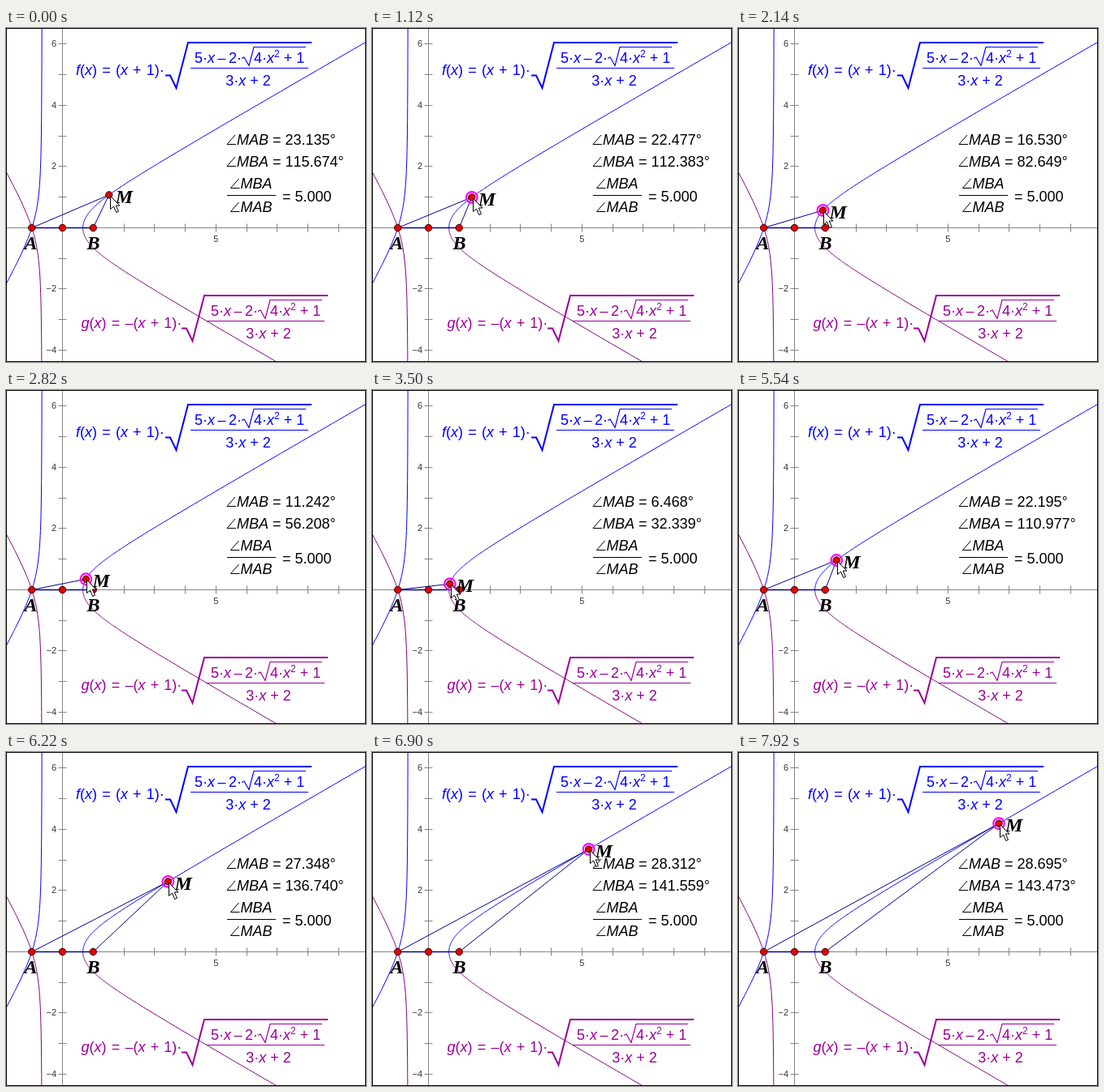
These frames come from a looping animation (443 by 412 pixels, 8000 ms). An HTML page:

```html
<!DOCTYPE html>
<html>
<head>
<meta charset="utf-8">
<style>
  html, body { margin: 0; height: 100%; overflow: hidden; background: #fff; }
  svg { display: block; }
  text { font: 18px "Liberation Sans", Arial, sans-serif; font-kerning: none; white-space: pre; }
  .tick { font-size: 11px; fill: #333; }
  .name { font: italic bold 24px "Liberation Serif", "Times New Roman", serif; }
  .i { font-style: italic; }
  .sup { font-size: 12px; }
  .line { fill: none; stroke: currentColor; }
</style>
</head>
<body>
<svg id="stage" width="443" height="412" viewBox="0 0 443 412"></svg>
<script>
const UNIT = 37.75, OX = 69.5, OY = 246.5, LOOP = 8000;
const X = x => OX + x * UNIT, Y = y => OY - y * UNIT;
const it = s => `<tspan class="i">${s}</tspan>`;
const text = (x, y, s, attrs = '') => `<text x="${x}" y="${y}" ${attrs}>${s}</text>`;
const line = (d, width = 1, attrs = '') => `<path class="line" d="${d}" stroke-width="${width}" ${attrs}/>`;
const dot = (x, y) => `<circle cx="${x}" cy="${y}" r="4.2" fill="#e60000" stroke="#300"/>`;

const f = x => (x + 1) * Math.sqrt(Math.max(0, (5 * x - 2 * Math.sqrt(4 * x * x + 1)) / (3 * x + 2)));

// Squared parameter keeps the samples dense near the steep ends at ±2/3.
function branch(side, sign, end) {
  let d = '';
  for (let s = side > 0 ? 0 : 0.03; s < end; s += 0.015) {
    const x = side * (2 / 3 + s * s);
    d += (d ? 'L' : 'M') + X(x).toFixed(2) + ' ' + Y(sign * f(x)).toFixed(2);
  }
  return d;
}
const curve = (sign, color) => line(branch(-1, sign, 1.12) + branch(1, sign, 3.08), 1, `color="${color}"`);

function axes() {
  let d = `M1 ${OY}H442M${OX} 1V411`, labels = '';
  for (let n = -1; n < 10; n++) d += `M${Math.floor(X(n)) + .5} ${OY - 5}v10`;
  for (let n = -4; n < 7; n++) {
    d += `M${OX - 5} ${Math.ceil(Y(n)) - .5}h10`;
    if (n && n % 2 === 0) labels += text(62, Y(n) + 3, String(n).replace('-', '−'), 'class="tick" text-anchor="end"');
  }
  labels += text(X(5), 264, '5', 'class="tick" text-anchor="middle"');
  return line(d, 1, 'color="#858585"') + labels;
}

const x = it('x');

function rootFraction(dx, dy, denomX) {
  return `<g transform="translate(${dx} ${dy})">` +
    line('M196 58.5H202L209.5 74L224 18H376', 2) +
    line('M227 49.5H372') +
    line('M290 37.5L293 36L299 46.5L305 23.5H369', 1.2) +
    text(232, 42.5, `5·${x} – 2·`, 'word-spacing="-1.5"') +
    text(305, 42.5, `4·${x}<tspan class="sup" dy="-7">2</tspan><tspan dy="7"> + 1</tspan>`) +
    text(denomX, 71, `3·${x} + 2`, 'text-anchor="middle"') + '</g>';
}

const formula = (color, left, y, s, root) =>
  `<g fill="${color}" color="${color}">${text(left, y, s, 'word-spacing="1.2"')}${root}</g>`;

const angle = (left, y, name, tail = '') =>
  line(`M${left + 11} ${y - 12}L${left + 1} ${y - .5}h11`) + text(left + 13, y, it(name) + tail);

stage.innerHTML =
  axes() + curve(-1, '#800080') + curve(1, '#00f') +
  line(`M${X(-1)} ${OY}H${X(1)}`, 1.3, 'color="#0000a0"') +
  line('', 1, 'id="sides" color="#000090"') +
  dot(X(-1), OY) + dot(OX, OY) + dot(X(1), OY) +
  formula('#00f', 86, 57.5, `${it('f')}(${x}) = (${x} + 1)·`, rootFraction(0, 0, 298)) +
  formula('#909', 92.5, 369.5, `${it('g')}(${x}) = –(${x} + 1)·`, rootFraction(20, 312, 303)) +
  angle(271, 144, 'MAB', '<tspan id="alpha"></tspan>') +
  angle(271, 171, 'MBA', '<tspan id="beta"></tspan>') +
  angle(275.5, 198, 'MBA') + line('M272 206.5H332') + angle(275.5, 227, 'MAB') +
  text(340, 214, '= 5.000') +
  text(22.5, 272.5, 'A', 'class="name"') + text(99.5, 272.5, 'B', 'class="name"') +
  `<g id="point"><circle id="ring" r="6.8" fill="none" stroke="#f0f" stroke-width="2.2"/>${dot(0, 0)}${text(8, 10, 'M', 'class="name"')}</g>` +
  '<path id="cursor" d="M0 0V16L4 12.5L7.2 20L10 18.8L6.8 11.5H11.5Z" fill="#fff" stroke="#000"/>' +
  '<rect x=".5" y=".5" width="442" height="411" fill="none" stroke="#000"/>';

// Turning points of the drag: time and angle MBA in degrees.
const keys = [
  [0, 115.674], [780, 115.674], [2140, 82.649], [3500, 32.339], [3840, 27.1], [4180, 46.5],
  [4520, 46.5], [4860, 69.924], [6220, 136.74], [6900, 141.559], [7240, 143.41], [7920, 143.473]
];

const rise = i => keys[i] && keys[i + 1] ? (keys[i + 1][1] - keys[i][1]) / (keys[i + 1][0] - keys[i][0]) : 0;
function tangent(i) {
  const a = rise(i - 1), b = rise(i);
  return a * b > 0 ? 2 * a * b / (a + b) : 0;
}

// Monotone cubic through the keys.
function angleAt(t) {
  const i = keys.findLastIndex(k => k[0] <= t);
  if (i === keys.length - 1) return keys[i][1];
  const [t0, b0] = keys[i], [t1, b1] = keys[i + 1];
  const h = t1 - t0, u = (t - t0) / h, v = 1 - u;
  return b0 + (b1 - b0) * u * u * (3 - 2 * u) + h * u * v * (v * tangent(i) - u * tangent(i + 1));
}

const el = id => document.getElementById(id);
const place = (id, px, py) => el(id).setAttribute('transform', `translate(${px} ${py})`);
const slope = deg => Math.tan(deg * Math.PI / 180);

function draw(now) {
  const t = now % LOOP;
  // The drag advances in jumps of 340 ms.
  const beta = angleAt(Math.max(0, 100 + 340 * Math.floor((t - 100) / 340)));
  const alpha = beta / 5, a = slope(alpha), b = slope(beta);
  const px = (b - a) / (a + b), mx = X(px), my = Y(a * (px + 1));
  el('sides').setAttribute('d', `M${X(-1)} ${OY}L${mx} ${my}L${X(1)} ${OY}`);
  place('point', mx, my);
  place('cursor', Math.round(mx) + 1.5, Math.round(my) + 1.5);
  el('ring').setAttribute('visibility', t < 100 ? 'hidden' : 'visible');
  el('alpha').textContent = ` = ${alpha.toFixed(3)}°`;
  el('beta').textContent = ` = ${beta.toFixed(3)}°`;
}

const start = performance.now();
function tick() {
  draw(performance.now() - start);
  requestAnimationFrame(tick);
}
tick();
</script>
</body>
</html>
```
